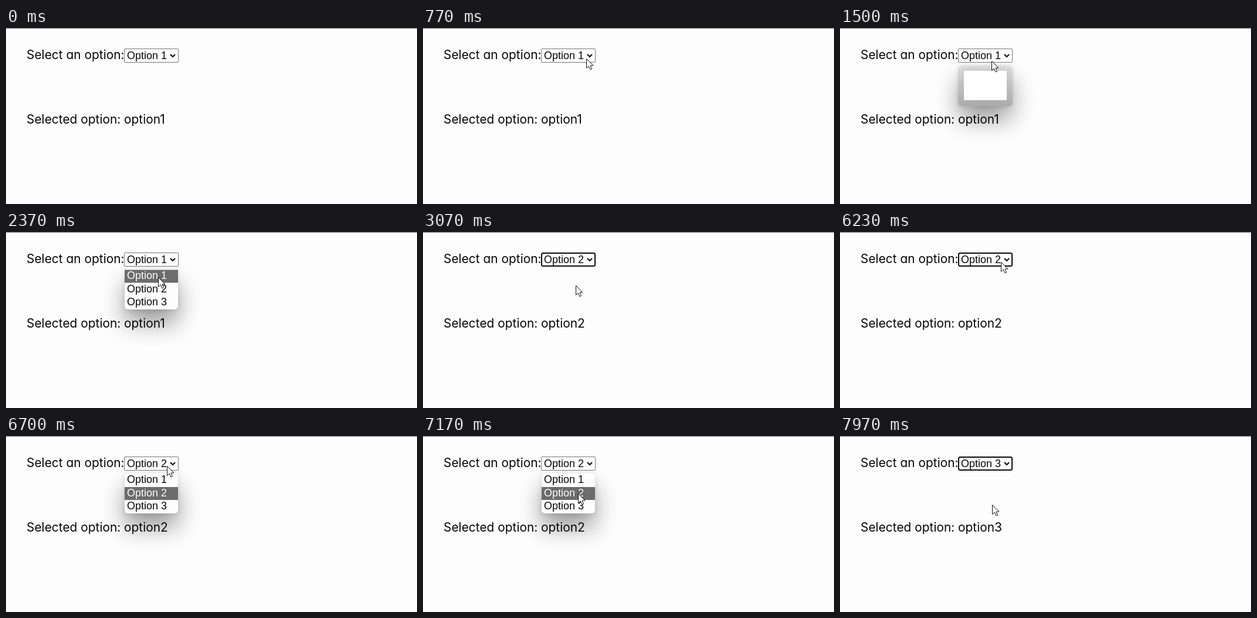
An HTML page for the animation above (8000 ms loop, 700x300 px).

```html
<!DOCTYPE html>
<html lang="en">
<head>
<meta charset="utf-8">
<title>Select demo</title>
<style>
html, body { margin: 0; width: 100%; height: 100%; overflow: hidden; background: #fdfdfd; }
svg { display: block; }
.label { font: 20.9px Inter, "Open Sans", sans-serif; font-feature-settings: "cv11"; }
.option { font: 18px "Liberation Sans", Arial, sans-serif; }
text { fill: #060606; white-space: pre; }
</style>
</head>
<body>
<svg width="700" height="300" viewBox="0 0 700 300">
  <defs>
    <filter id="wide" x="-100%" y="-100%" width="300%" height="300%"><feGaussianBlur stdDeviation="20"/></filter>
    <filter id="tight" x="-50%" y="-50%" width="200%" height="200%"><feGaussianBlur stdDeviation="4"/></filter>
    <linearGradient id="rimFill" x1="0" y1="0" x2="0" y2="1">
      <stop offset="0" stop-color="#d4d4d4" stop-opacity=".5"/>
      <stop offset="1" stop-color="#ababab"/>
    </linearGradient>
  </defs>
  <rect width="700" height="300" fill="#fdfdfd"/>
  <rect width="700" height="1" fill="#6c6c6c"/>

  <g id="shadow">
    <rect x="202" y="87" width="91" height="69" rx="6" opacity=".38" filter="url(#wide)"/>
    <rect x="202" y="65" width="91" height="69" rx="6" opacity=".1" filter="url(#tight)"/>
  </g>

  <text class="label" x="35" y="53">Select an option:</text>
  <text class="label" x="35" y="163">Selected option:</text>
  <text class="label" x="201" y="163" id="result"></text>

  <rect id="box" fill="#fefefe"/>
  <text class="option" x="206" y="53" id="value"></text>
  <path d="M280 45l4 4 4-4" fill="none" stroke="#060606" stroke-width="2"/>

  <g id="blank">
    <rect x="201" y="64" width="93" height="69" rx="6" fill="url(#rimFill)"/>
    <rect x="211" y="73" width="73" height="50" fill="#fefefe"/>
  </g>
  <g id="list">
    <rect x="202" y="63" width="91" height="69" rx="6" fill="#fdfdfd"/>
    <rect id="mark" x="202" width="91" height="22" fill="#6c6c6c"/>
  </g>

  <path id="arrow" d="M.5 .5V16.5L4.3 13L7 19L9.6 17.8L7 12H12z" fill="#fff" stroke="#111" stroke-width="1"/>
  <path id="beam" d="M-3.5 -7.5h2.5l1 1 1-1h2.5M0 -6.5V6.5M-3.5 7.5h2.5l1-1 1 1h2.5M-2 1h4" fill="none" stroke="#222" stroke-width="1.2"/>
</svg>
<script>
const LOOP = 8000;
const $ = id => document.getElementById(id);

// Times at which the popup opens and closes
const popups = [[1500, 3070], [6630, 7930]];
const LIST_DELAY = 35;

// Pointer path: time, x, y
const path = [
  [370, 266, 150], [560, 274, 100], [760, 278, 52], [1000, 258, 56],
  [2170, 258, 56], [2530, 260, 91],
  [3930, 260, 91], [4170, 259, 152],
  [4330, 259, 152], [4470, 257, 157], [4530, 257, 157], [4670, 256, 156],
  [5000, 256, 156], [5270, 266, 67],
  [5480, 266, 67], [5600, 274, 51],
  [6970, 274, 51], [7270, 260, 114],
  [7440, 260, 114], [7470, 259, 117]
];

const rows = [1, 2, 3].map(n => {
  const t = document.createElementNS("http://www.w3.org/2000/svg", "text");
  t.setAttribute("class", "option");
  t.setAttribute("x", 206);
  t.setAttribute("y", [80, 103, 125][n - 1]);
  t.textContent = "Option " + n;
  $("list").append(t);
  return t;
});

const show = (id, on) => $(id).style.display = on ? "" : "none";

function setAttrs(el, attrs) {
  for (const k in attrs) el.setAttribute(k, attrs[k]);
}

function pointerAt(t) {
  let i = path.length - 1;
  while (i > 0 && path[i][0] > t) i--;
  const a = path[i], b = path[i + 1] || a;
  const p = b === a ? 0 : Math.max(0, (t - a[0]) / (b[0] - a[0]));
  const e = p * p * (3 - 2 * p);
  return [1, 2].map(k => Math.round(a[k] + (b[k] - a[k]) * e));
}

function render(t) {
  const [x, y] = pointerAt(t);
  const popup = popups.find(([from, to]) => t >= from && t < to);
  const listed = !!popup && t >= popup[0] + LIST_DELAY;
  const chosen = 1 + popups.filter(p => t >= p[1]).length;
  const focused = !popup && chosen > 1;

  $("value").textContent = "Option " + chosen;
  $("result").textContent = "option" + chosen;
  setAttrs($("box"), focused
    ? { x: 202, y: 36, width: 91, height: 22, rx: 2.5, stroke: "#0a0a0a", "stroke-width": 2 }
    : { x: 201.5, y: 35.5, width: 92, height: 23, rx: 1.5, stroke: "#767676", "stroke-width": 1 });

  show("shadow", popup);
  show("blank", popup && !listed);
  show("list", listed);
  const hover = y < 64 ? chosen : y < 87 ? 1 : y < 109 ? 2 : 3;
  $("mark").setAttribute("y", 64.5 + (hover - 1) * 22.5);
  rows.forEach((r, i) => r.style.fill = i + 1 === hover ? "#fdfdfd" : "#060606");

  const visible = t >= path[0][0], overText = y > 142;
  show("arrow", visible && !overText);
  show("beam", visible && overText);
  for (const id of ["arrow", "beam"]) $(id).setAttribute("transform", `translate(${x} ${y})`);
}

const start = performance.now();
function tick() {
  render((performance.now() - start) % LOOP);
  requestAnimationFrame(tick);
}
tick();
</script>
</body>
</html>
```
